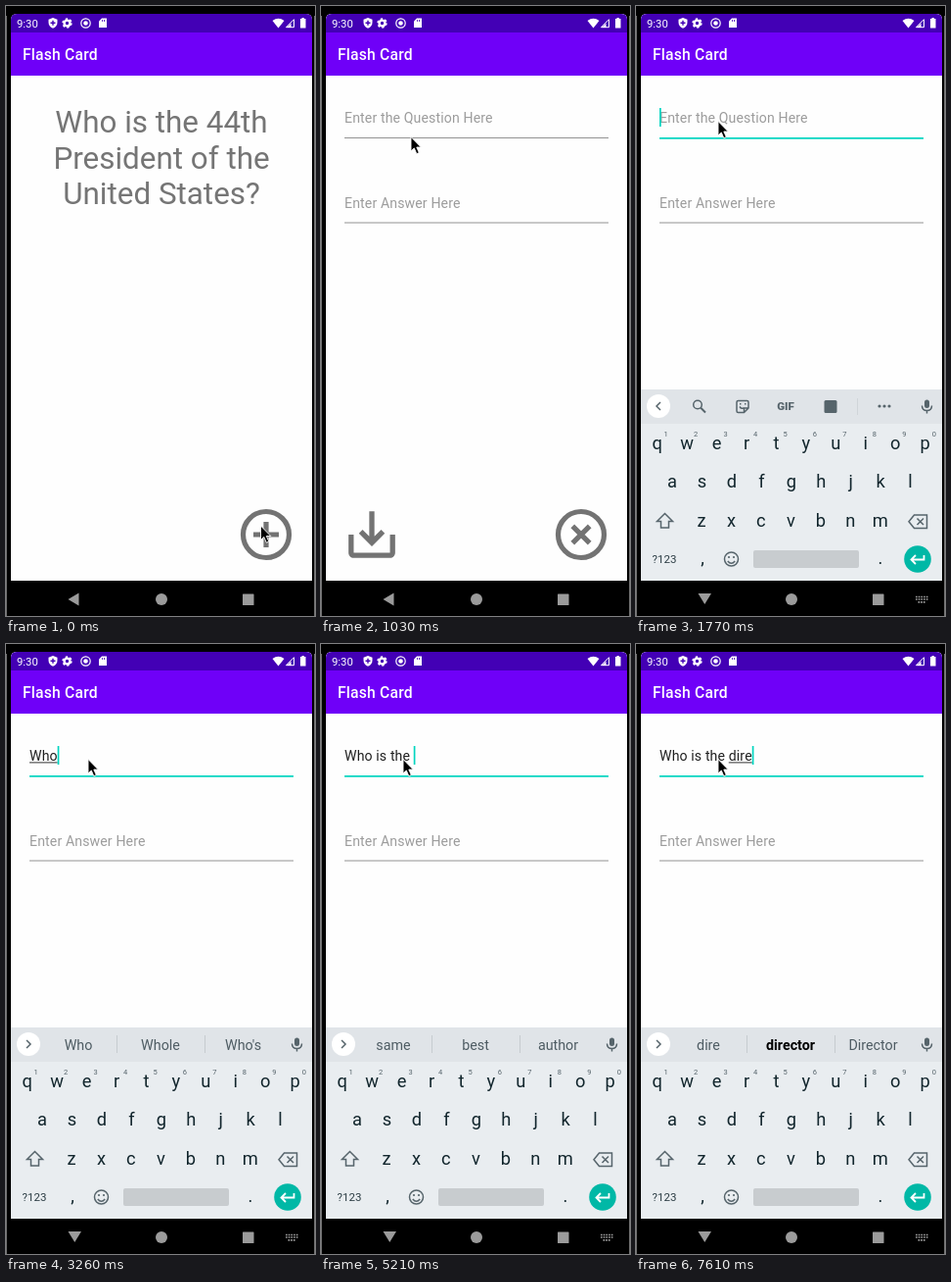
Recreate the animation shown at these times as an HTML page. Size 316 px wide and 622 px high, loop 8000 ms.

```html
<!DOCTYPE html>
<html lang="en">
<head>
<meta charset="utf-8">
<title>Flash Card</title>
<style>
  html, body { margin: 0; width: 100%; height: 100%; overflow: hidden; background: #000; }
  svg { display: block; width: 316px; height: 622px; font-family: Roboto, "Noto Sans", sans-serif; }
  text { white-space: pre; }
  .mid { text-anchor: middle; }
  .title { font-size: 15.7px; font-weight: 500; letter-spacing: .0125em; fill: #fff; }
  .question { font-size: 31.4px; fill: #757575; }
  .field { font-size: 14.1px; letter-spacing: .009em; fill: #212121; }
  .hint { fill: #9c9c9c; }
  .key { font-size: 18.3px; fill: #12262d; }
  .small { font-size: 11.5px; fill: #2c3d44; }
  .digit { font-size: 7.5px; fill: #56646b; }
  .word { font-size: 14.3px; fill: #4e5c63; }
  .word.strong { font-weight: 700; fill: #000; }
  .line { fill: none; stroke: #56646b; stroke-width: 1.5; }
  .big { fill: none; stroke: #737373; stroke-width: 5.2; }
</style>
</head>
<body>
<svg viewBox="0 0 316 622">
  <defs>
    <clipPath id="screen"><path d="M5 586V14q0-6 6-6H307q6 0 6 6V586z"/></clipPath>
    <g id="bars">
      <rect x="5" y="8" width="308" height="578" fill="#fefefe"/>
      <rect x="5" y="8" width="308" height="19" fill="#4300b5"/>
      <rect x="5" y="27" width="308" height="44" fill="#6f00f8"/>
      <text class="title" x="17" y="55">Flash Card</text>
    </g>
  </defs>

  <rect width="316" height="622" fill="#000"/>
  <path d="M.5 10V622M315.5 10V622" stroke="#6b6b6b"/>

  <g clip-path="url(#screen)">
    <g id="card">
      <use href="#bars"/>
      <g class="question mid">
        <text x="159" y="129">Who is the 44th</text>
        <text x="159" y="165.7">President of the</text>
        <text x="159" y="202.4">United States?</text>
      </g>
      <g class="big">
        <circle cx="266" cy="539" r="23.5"/>
        <path d="M253 539h26M266 526v26"/>
      </g>
    </g>

    <g id="form">
      <use href="#bars"/>
      <text id="hint" class="field hint" x="24" y="119">Enter the Question Here</text>
      <text class="field hint" x="24" y="205.5">Enter Answer Here</text>
      <rect id="rule" x="24" y="134" width="270" height="1" fill="#939393"/>
      <rect x="24" y="220.5" width="270" height="1" fill="#939393"/>
      <text id="typed" class="field" x="24" y="119"></text>
      <rect id="underline" y="120.4" height="1" fill="#333"/>
      <rect id="caret" y="104" width="1.7" height="19" fill="#03d5c0"/>
      <path fill="#737373" transform="translate(52 539) scale(2.65) translate(-12 -12)"
        d="M19 12v7H5v-7H3v7c0 1.1.9 2 2 2h14c1.1 0 2-.9 2-2v-7zM13 12.67l2.59-2.58L17 11.5l-5 5-5-5 1.41-1.41L11 12.67V3h2z"/>
      <g class="big">
        <circle cx="266" cy="539" r="23.5"/>
        <path d="M257.3 530.3l17.4 17.4M274.7 530.3l-17.4 17.4"/>
      </g>
    </g>

    <g id="keyboard">
      <rect x="5" y="391" width="308" height="195" fill="#e9edf0"/>
      <rect x="5" y="391" width="308" height="35" fill="#e0e4e8"/>
      <circle cx="23" cy="408" r="12" fill="#fff"/>
      <path id="chevron" d="M-2 -4l4 4-4 4" class="line"/>
      <g id="tools">
        <g class="line">
          <circle cx="63" cy="406.5" r="4.3"/>
          <path d="M66 409.5l5 5" stroke-width="2"/>
          <path d="M104.500 402.500h9q1.500 0 1.500 1.500v6l-4.500 4.500h-6q-1.500 0-1.500-1.500v-9q0-1.500 1.500-1.500zM115 410h-4.500v4.500M106 408.500q2 3 4.500 1"/>
        </g>
        <path d="M106 405h1.500v1.500h-1.500zM111 405h1.500v1.500h-1.500z" fill="#56646b"/>
        <text class="mid" x="153" y="412" font-size="11.5" font-weight="900" fill="#56646b">GIF</text>
        <rect x="192.500" y="402" width="13" height="13" rx="1.500" fill="#56646b"/>
        <path d="M226.500 400v17" stroke="#d0d5d9"/>
        <g fill="#56646b">
          <circle cx="249" cy="408" r="1.6"/><circle cx="254" cy="408" r="1.6"/><circle cx="259" cy="408" r="1.6"/>
        </g>
      </g>
      <g id="words">
        <path d="M113.500 399v18M203.500 399v18" stroke="#c6cbcf"/>
        <text class="word mid" x="74" y="413.500"></text>
        <text class="word mid" x="158" y="413.500"></text>
        <text class="word mid" x="242.500" y="413.500"></text>
      </g>
      <rect x="295" y="401.500" width="5" height="8.500" rx="2.500" fill="#56646b"/>
      <path class="line" d="M292.500 407.500q0 5 5 5t5-5M297.500 412.500v3"/>
      <g id="keys"></g>
      <g class="line">
        <path d="M29.500 517.500l8 8h-4v6.500h-8v-6.500h-4z"/>
        <path d="M284.500 519h13v13.500h-13l-5.500-6.750zM287.500 522.500l6.500 6.500M294 522.500l-6.500 6.500"/>
        <circle cx="97.500" cy="564" r="7"/>
        <path d="M93.800 566q3.700 4.500 7.400 0"/>
      </g>
      <g fill="#56646b"><circle cx="95" cy="562" r="1.100"/><circle cx="100" cy="562" r="1.100"/></g>
      <rect x="120" y="555" width="108" height="18" rx="2" fill="#c8cccf"/>
      <circle cx="288" cy="564" r="13.800" fill="#00b8a6"/>
      <path d="M294.500 560v4.500h-12.500M286 560l-4.500 4.500 4.500 4.500" fill="none" stroke="#fff" stroke-width="1.800"/>
    </g>
  </g>

  <g fill="#fff">
    <text x="11" y="21.500" font-size="11.3">9:30</text>
    <path d="M48 12l4.500 1.800v3q0 4-4.500 6-4.500-2-4.500-6v-3z"/>
    <path d="M48 14.800v5M45.500 17.300h5" stroke="#4300b5" stroke-width="1.400"/>
    <circle cx="62.500" cy="17.500" r="2.900" fill="none" stroke="#fff" stroke-width="2.400"/>
    <circle cx="62.500" cy="17.500" r="4.400" fill="none" stroke="#fff" stroke-width="1.600" stroke-dasharray="2.300 2.308"/>
    <circle cx="81.500" cy="17.500" r="4.700" fill="none" stroke="#fff" stroke-width="1.200"/>
    <circle cx="81.500" cy="17.500" r="2.300"/>
    <path d="M98 12.500h5v9.500h-8v-6.500z"/>
    <path d="M98.500 14v2M100.500 14v2" stroke="#4300b5" stroke-width=".8"/>
    <path d="M272.500 15q6-4.500 12 0l-6 7.500z"/>
    <path d="M286.500 21.700l8-8v8z" fill="none" stroke="#fff"/>
    <path d="M287 22l4.500-4.500v4.500z"/>
    <path d="M302.500 12h2.500v1h1.500v9.500h-5.500v-9.500h1.500z"/>
  </g>

  <g fill="#9b9b9b">
    <path id="back" d="M63.500 605l11-6.500v13z"/>
    <path id="down" d="M63.500 599h13.500l-6.750 11z"/>
    <circle cx="159" cy="605" r="6"/>
    <rect x="242" y="599.500" width="11.500" height="11.500" rx=".5"/>
    <path id="ime" d="M286 602.500h12.500M286 605h12.500M288.500 607.800h7.500" stroke="#9b9b9b" stroke-width="1.700" stroke-dasharray="1.700 1"/>
  </g>

  <path id="pointer" d="M0 0V14.500l3.300-3.100 2.500 5.800 2.500-1.100-2.500-5.600H10.300z" fill="#000" stroke="#fff" stroke-width=".9"/>
</svg>

<script>
const LOOP = 8000;
const $ = id => document.getElementById(id);
const show = (id, on) => { $(id).style.display = on ? "" : "none"; };
const clamp = v => Math.min(1, Math.max(0, v));
const mix = (a, b, p) => a + (b - a) * p;

// Screen updates arrive in uneven ticks until the keyboard is open.
const ticks = [0, 150, 300, 450, 600, 740, 880, 1030, 1180, 1330, 1480, 1620, 1770];

// start, committed text, word in progress, suggestions (* = bold)
const typing = [
  [0, "", "", ""],
  [2360, "", "W", "W We Was"],
  [2810, "", "Wh", "Wh Who What"],
  [3260, "", "Who", "Who Whole Who's"],
  [3410, "Who ", "", "was are is"],
  [3710, "Who ", "i", "i is it"],
  [4010, "Who ", "is", "is it isn't"],
  [4310, "Who is ", "", "your this the"],
  [4760, "Who is ", "t", "t the to"],
  [4910, "Who is ", "th", "th the this"],
  [5060, "Who is ", "the", "the them there"],
  [5210, "Who is the ", "", "same best author"],
  [6260, "Who is the ", "d", "d *day date"],
  [6560, "Who is the ", "di", "di did different"],
  [6710, "Who is the ", "dir", "dir dire direction"],
  [6860, "Who is the ", "dir", "dir *director Director"],
  [7610, "Who is the ", "dire", "dire *director Director"]
];
const blinks = [[1920, 2360], [5810, 6260], [7310, 7610]];

function addKey(label, x, y, cls = "key") {
  const el = document.createElementNS("http://www.w3.org/2000/svg", "text");
  el.setAttribute("class", cls + " mid");
  el.setAttribute("x", x);
  el.setAttribute("y", y);
  el.textContent = label;
  $("keys").append(el);
}
function addRow(letters, x, y) {
  [...letters].forEach((c, i) => addKey(c, x + i * 30.45, y));
}
addRow("qwertyuiop", 21.7, 452);
addRow("1234567890", 30.7, 439);
document.querySelectorAll("#keys text").forEach((el, i) => {
  if (i > 9) el.setAttribute("class", "digit mid");
});
addRow("asdfghjkl", 37, 491);
addRow("zxcvbnm", 67, 531);
addKey("?123", 29, 568, "small");
addKey(",", 68, 569);
addKey(".", 250, 569);

function measure(text) {
  $("typed").textContent = text;
  return text ? $("typed").getComputedTextLength() : 0;
}

function drawPointer(t) {
  const p = clamp((t - 600) / 430), e = p * p * (3 - 2 * p);
  const q = clamp((t - 1030) / 300);
  const x = mix(mix(260.5, 92, e), 84, q);
  const y = mix(mix(530, 133.5, e), 117.5, q);
  $("pointer").setAttribute("transform", `translate(${x} ${y})`);
}

function drawField(t, [, done, word]) {
  const focused = t >= 1480;
  const start = measure(done), end = measure(done + word);
  show("hint", !(done + word));
  $("rule").setAttribute("height", focused ? 1.7 : 1);
  $("rule").setAttribute("fill", focused ? "#03d5c0" : "#939393");
  $("underline").setAttribute("x", 24 + start);
  $("underline").setAttribute("width", end - start);
  $("caret").setAttribute("x", 24 + end);
  show("caret", focused && !blinks.some(([a, b]) => t >= a && t < b));
}

function drawKeyboard(t, [, , , list]) {
  const p = clamp((t - 1400) / 370);
  const open = t >= 1480;
  show("keyboard", open);
  $("keyboard").setAttribute("transform", `translate(0 ${195 * (1 - p) ** 2})`);
  show("back", !open);
  show("down", open);
  show("ime", open);
  show("tools", !list);
  show("words", list);
  $("chevron").setAttribute("transform", `translate(23 408) scale(${list ? 1 : -1} 1)`);
  const words = list.split(" ");
  document.querySelectorAll(".word").forEach((el, i) => {
    const w = words[i] || "";
    el.classList.toggle("strong", w[0] === "*");
    el.textContent = w.replace("*", "");
  });
}

function draw(now) {
  const time = now % LOOP;
  const t = time < 1920 ? ticks.findLast(k => k <= time) : time;
  const entry = typing.findLast(k => k[0] <= t);
  const p = t < 150 ? 0 : clamp((t - 75) / 450);
  show("form", p > 0);
  $("form").setAttribute("opacity", p);
  $("form").setAttribute("transform", `translate(0 ${45 * (1 - p) ** 2})`);
  drawField(t, entry);
  drawKeyboard(t, entry);
  drawPointer(t);
}

const begin = performance.now();
function loop() {
  draw(performance.now() - begin);
  requestAnimationFrame(loop);
}
loop();
</script>
</body>
</html>
```
